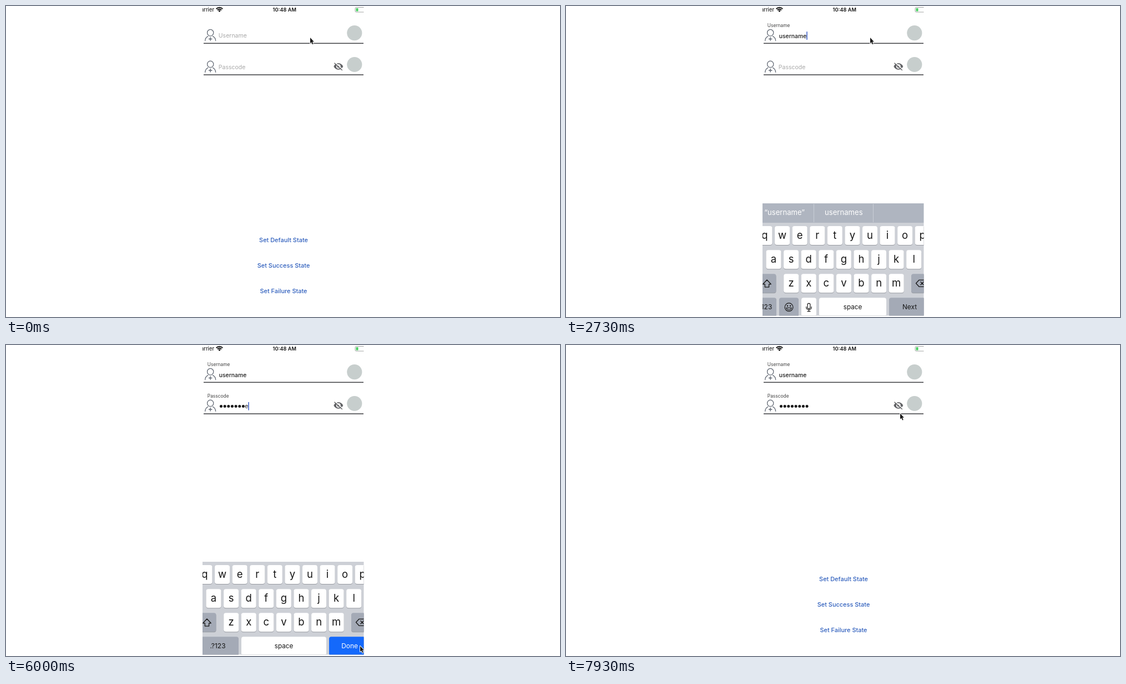
These frames come from a looping animation (998x561 px, 8000 ms). An HTML page with a canvas:

```html
<!DOCTYPE html>
<html lang="en">
<head>
<meta charset="utf-8">
<title>Login form</title>
<style>
html, body { margin: 0; width: 100%; height: 100%; overflow: hidden; background: #fff; }
canvas { display: block; }
</style>
</head>
<body>
<canvas id="stage" width="998" height="561"></canvas>
<script>
const ctx = document.getElementById('stage').getContext('2d');
const LOOP = 8000;
const PITCH = 31.58;       // distance between letter keys
const KEY_TOP = 391;       // top of the keyboard without the suggestion bar
const TEXT_X = 383.7;
const DOT_PITCH = 6.65;
const ROW_GAP = 56.8;

const typedName = [[1400, 'u'], [1600, 'us'], [1730, 'use'], [1870, 'user'],
  [2200, 'usern'], [2330, 'userna'], [2470, 'usernam'], [2600, 'username']];
const typedCode = [[4730, 'p'], [4930, 'pa'], [5130, 'pas'], [5330, 'pass'],
  [5600, 'passc'], [5730, 'passco'], [5870, 'passcod'], [6000, 'passcode']];
const suggestions = [[1600, ['“u”', 'use', 'up']], [2000, ['“user”', 'users', 'username']],
  [2330, ['“userna”', 'username', '']], [2730, ['“username”', 'usernames', '']]];
const pointerPath = [[0, 548, 57], [3220, 548, 57], [3530, 580, 371], [3670, 637.5, 543],
  [3730, 638, 543], [7330, 638, 543], [7800, 609, 164], [7930, 602, 123.5]];

const clamp = v => Math.max(0, Math.min(1, v));
const mix = (a, b, p) => a + (b - a) * p;
const progress = (t, start, end) => clamp((t - start) / (end - start));

function latest(steps, t, fallback) {
  let value = fallback;
  for (const [time, next] of steps) if (t >= time) value = next;
  return value;
}

function text(str, x, y, size, color, align = 'left', weight = 400) {
  ctx.font = `${weight} ${size}px Inter, sans-serif`;
  ctx.textAlign = align;
  ctx.fillStyle = color;
  ctx.fillText(str, x, y);
}

function rect(x, y, w, h, color) {
  ctx.fillStyle = color;
  ctx.fillRect(x, y, w, h);
}

function dot(x, y, r, color) {
  ctx.fillStyle = color;
  ctx.beginPath();
  ctx.arc(x, y, r, 0, 2 * Math.PI);
  ctx.fill();
}

// Draws an SVG path at x, y; a line width strokes it, otherwise it is filled.
function shape(d, x, y, color, lineWidth) {
  const path = new Path2D(d);
  ctx.save();
  ctx.translate(x, y);
  ctx.lineJoin = 'round';
  if (lineWidth) {
    ctx.strokeStyle = color;
    ctx.lineWidth = lineWidth;
    ctx.stroke(path);
  } else {
    ctx.fillStyle = color;
    ctx.fill(path);
  }
  ctx.restore();
}

function statusBar() {
  text('Carrier', 375, 10.3, 9.3, '#222', 'right', 500);
  text('10:48 AM', 501.7, 10.3, 9.2, '#111', 'center', 600);
  for (const r of [8.2, 5.2]) {
    ctx.beginPath();
    ctx.arc(384.5, 11, r, -2.36, -0.78);
    ctx.strokeStyle = '#111';
    ctx.lineWidth = 1.9;
    ctx.stroke();
  }
  shape('M0 0L-2.3 -2.5A3.3 3.3 0 0 1 2.3 -2.5Z', 384.5, 11, '#111');
  shape('M18 0H2Q0 0 0 2V6.5Q0 8.5 2 8.5H18', 629, 2.5, '#a4a6a5', 1);
  rect(630.5, 4, 4, 5.5, '#4cd164');
}

function fieldFrame(dy) {
  const ink = '#646b76';
  ctx.beginPath();
  ctx.ellipse(368.2, 48.2 + dy, 5.6, 5.9, 0, 0, 2 * Math.PI);
  ctx.strokeStyle = ink;
  ctx.lineWidth = 1.3;
  ctx.stroke();
  shape('M-9.5 10.8A10 10 0 0 1 -4 1.9M9.5 10.8A10 10 0 0 0 4 1.9', 368.2, 52.4 + dy, ink, 1.3);
  shape('M-3.2 0H3.2M0 -3.2V3.2', 368.2, 59.5 + dy, ink, 1.4);
  dot(627.8, 48.7 + dy, 13.6, '#c7cecd');
  rect(356, 66.6 + dy, 288, 1.5, '#3c3d41');
}

function label(str, dy, p) {
  const gray = Math.round(mix(168, 66, p));
  text(str, mix(382.8, 362.8, p), mix(56.7, 38, p) + dy, mix(10.5, 8.4, p),
    `rgb(${gray},${gray},${gray})`);
}

function hiddenEye() {
  const ink = '#626366';
  shape('M-8.5 0C-5.2 -7.7 5.2 -7.7 8.5 0C5.2 7.7 -5.2 7.7 -8.5 0Z', 598.8, 109, ink);
  dot(598.8, 109, 3.9, '#fff');
  dot(598.8, 109, 2.3, ink);
  shape('M-6.2 -7.2L8.3 6', 598.8, 109, '#fff', 1.4);
  shape('M-7.4 -6.3L7 6.9', 598.8, 109, ink, 1.4);
}

function caret(x, dy, alpha) {
  ctx.globalAlpha = alpha;
  rect(x, 46.2 + dy, 1.5, 14.7, '#3c5fca');
  ctx.globalAlpha = 1;
}

function caretAlpha(t) {
  if (t < 800) return 0.8;
  if (t >= 3870 && t < 3930) return 0.65;
  for (const [start, end] of [[930, 1330], [3330, 3870], [4470, 4730], [6530, 7000]])
    if (t >= start && t < end) return 1 - progress(t, start - 30, start + 200);
  return 1;
}

function fields(t) {
  fieldFrame(0);
  fieldFrame(ROW_GAP);
  hiddenEye();
  label('Username', 0, progress(t, 530, 810));
  label('Passcode', ROW_GAP, progress(t, 3930, 4210));

  const name = latest(typedName, t, '');
  text(name, TEXT_X, 57.5, 10.4, '#1c1c1c', 'left', 500);
  if (t >= 530 && t < 3930) caret(TEXT_X + ctx.measureText(name).width, 0, caretAlpha(t));

  const code = latest(typedCode, t, '');
  const masked = t >= 7000 ? code.length : Math.max(0, code.length - 1);
  for (let i = 0; i < masked; i++) dot(387.5 + i * DOT_PITCH, 110.5, 2.5, '#151515');
  const tail = code.slice(masked);
  const tailX = TEXT_X + masked * DOT_PITCH;
  text(tail, tailX, 114.3, 10.4, '#222');
  if (t >= 3930 && t < 7000) caret(tailX + ctx.measureText(tail).width, ROW_GAP, caretAlpha(t));
}

function key(x, y, w, caption = '', size = 18.5, fill = '#fff', ink = '#151515') {
  for (const [dy, color] of [[1, '#979aa1'], [0, fill]]) {
    ctx.fillStyle = color;
    ctx.beginPath();
    ctx.roundRect(x, y + dy, w, 34, 4);
    ctx.fill();
  }
  text(caption, x + w / 2, y + (size > 15 ? 22.6 : 20.8), size, ink, 'center');
}

function keyRow(letters, firstX, y) {
  [...letters].forEach((c, i) => key(firstX + i * PITCH - 13.5, y, 27, c));
}

function keyboard(offset, secure, words) {
  const special = '#a4aab6';
  const ink = '#171717';
  ctx.save();
  ctx.translate(0, offset);
  rect(354, KEY_TOP, 291, 180, '#cdd0d6');
  if (!secure) {
    rect(354, 356, 291, 35, '#afb5c0');
    for (const x of [446, 553]) rect(x, 357, 1, 33, '#c9ced6');
    words.forEach((word, i) => text(word, 393.7 + i * 106.6, 377, 13.1, '#fff', 'center'));
  }
  keyRow('qwertyuiop', 358, 397);
  keyRow('asdfghjkl', 374, 440.2);
  keyRow('zxcvbnm', 405.7, 483.3);

  key(340, 483.3, 38.5, '', 12, special);
  shape('M0 -7L7.3 0.8H3.6V6.2H-3.6V0.8H-7.3Z', 362, 501, ink, 1.3);
  key(622, 483.3, 40, '', 12, special);
  shape('M0 0L5.5 -6H22V6H5.5ZM8 -3L14 3M14 -3L8 3', 630.5, 500.3, ink, 1.3);

  if (secure) {
    key(344, 526.3, 75, '.?123', 12, special);
    key(424, 526.3, 153, 'space', 11.7);
    key(582, 526.3, 74, 'Done', 11.9, '#1469fb', '#fff');
  } else {
    key(344, 526.3, 35, '123', 12, special);
    key(384, 526.3, 35, '', 12, special);
    shape('M7.4 0A7.4 7.4 0 1 1 -7.4 0A7.4 7.4 0 1 1 7.4 0ZM-4.6 1.2H4.6C3.8 6 -3.8 6 -4.6 1.2Z',
      401.6, 543.3, ink, 1.2);
    dot(399, 541, 1.2, ink);
    dot(404.2, 541, 1.2, ink);
    key(424, 526.3, 27);
    shape('M-2.4 -4.5A2.4 2.4 0 0 1 2.4 -4.5V0.5A2.4 2.4 0 0 1 -2.4 0.5Z' +
      'M-4.7 -1V0.5C-4.7 6 4.7 6 4.7 0.5V-1M0 4.7V7.5M-3 7.5H3', 437.5, 543.3, ink, 1.2);
    key(456, 526.3, 121, 'space', 11.7);
    key(582, 526.3, 74, 'Next', 11.8, special);
  }
  ctx.restore();
}

function pointer(t) {
  if (t >= 3530 && t < 3670) return;
  let [, x, y] = pointerPath[pointerPath.length - 1];
  for (let i = 1; i < pointerPath.length; i++) {
    const [t0, x0, y0] = pointerPath[i - 1];
    const [t1, x1, y1] = pointerPath[i];
    if (t < t0 || t >= t1) continue;
    const p = progress(t, t0, t1);
    x = mix(x0, x1, p);
    y = mix(y0, y1, p);
  }
  const arrow = 'M0 0V10.2L2.3 8.2L4 12.2L5.7 11.4L4 7.6H6.9Z';
  shape(arrow, x, y, '#fff', 1.8);
  shape(arrow, x, y, '#1a1a1a');
}

function draw(t) {
  rect(0, 0, 998, 561, '#fff');
  ctx.save();
  ctx.beginPath();
  ctx.rect(354, 0, 290.5, 558.5);
  ctx.clip();
  statusBar();
  fields(t);
  ['Default', 'Success', 'Failure'].forEach((state, i) =>
    text(`Set ${state} State`, 500, 426.3 + i * 46, 10.95, '#2f5fbd', 'center', 450));
  if (t >= 530 && t < 7800) {
    const rise = 203 * Math.exp(-(t - 500) / 41);
    const fall = 173 * (1 - Math.exp(-Math.max(0, t - 7150) / 78));
    keyboard(rise + fall, t >= 3930, latest(suggestions, t, []));
  }
  pointer(t);
  ctx.restore();
}

function tick() {
  draw(performance.now() % LOOP);
  requestAnimationFrame(tick);
}
tick();
</script>
</body>
</html>
```
